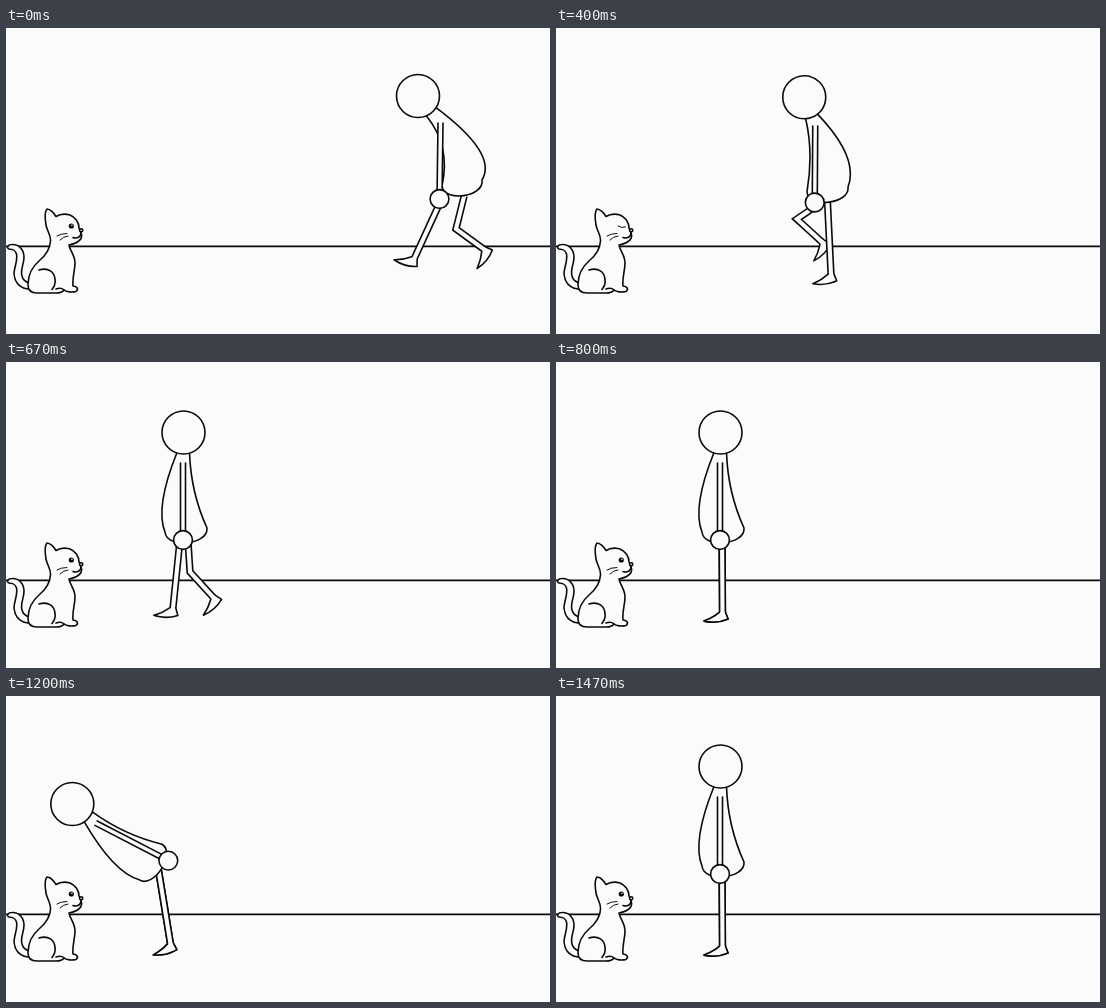
Recreate the animation shown at these times as an HTML page. Size 544 by 306 pixels, loop 2.54 s.

```html
<!DOCTYPE html>
<html lang="en">
<head>
<meta charset="utf-8">
<title>Walking up to the cat</title>
<style>
  html, body { margin: 0; width: 100%; height: 100%; overflow: hidden; background: #fbfbfb; }
  svg { display: block; width: 100vw; height: 100vh; }
  .ink { fill: #fbfbfb; stroke: #0a0a0a; stroke-width: 1.6; stroke-linecap: round; stroke-linejoin: round; }
  .line { fill: none; }
  .thin { fill: none; stroke-width: 1; }
  .tube { fill: none; stroke: #0a0a0a; stroke-width: 7.3; }
  .core { fill: none; stroke: #fbfbfb; stroke-width: 4.1; stroke-linecap: square; }
</style>
</head>
<body>
<svg viewBox="0 0 544 306">
  <path class="ink line" d="M0 218.4H544"/>

  <g class="ink">
    <path d="M22 261C14 260 9 255 8 246C8 239 12 233 10.500 226C9 221 6 221.500 3 221C0 219.500 2 216.500 6 216.500C13 216 18 222 18 229C18 237 14 241 16 248C17 252 20 254 23 255"/>
    <path d="M41 181C38.500 184 39 191 40 197C41 203 45 207 44.500 213C44 222 39 228 33 233C26 239 22 248 22 257C22 263 25 265 31 265L50 265C55 265 57 263.500 58 262C60 264 66 264.500 70 263.500C73 261 71 258.500 67 258C66 250 69 243 69 235C69 227 64 223 63 217C68 216 73 214 75 210.500C76 208 75.500 206 75 205L73 200C73 194 69 189 64 187C59 185.500 54 186 50 188.500C48 185 44 181 41 181Z"/>
    <path class="line" d="M33 242C42 239 49 244 49 252C50 257 47 260 46 261.500M58 262C56 260 53 260 50 261M75 205C75 209 71 211 67 209.500"/>
    <path class="thin" d="M51 208Q55 205.500 61 205.500M54 212Q57 208.500 62 208"/>
    <circle cx="75.200" cy="202.300" r="1.600"/>
  </g>
  <g id="open">
    <circle cx="65.300" cy="198" r="2.600" fill="#0a0a0a"/>
    <circle cx="65.900" cy="197.200" r="0.800" fill="#fbfbfb"/>
  </g>
  <path id="shut" class="ink thin" d="M62 198Q65 200.500 69.500 199"/>

  <g id="legs"></g>
  <path id="torso" class="ink"/>
  <path id="sleeve" fill="#fbfbfb"/>
  <path id="arm" class="ink line"/>
  <circle id="hand" class="ink" r="9.400"/>
  <circle id="head" class="ink" r="21.500"/>
</svg>
<script>
const $ = id => document.getElementById(id);
const LOOP = 2540, STEP = 200 / 3, LAST = 22, STOPPED = 13, LOWEST = 18;
const BONE = 34, HEAD = 21.5, SAG = 17;

// Upper body around the hip, standing tall and hunched over
const tall = { head: [-1.5, -107.5], shoulder: [-2, -77], hand: [-2, 0],
  front: [-20, -8], belly: [-30, -33], rear: [22, -12], back: [6, -47] };
const hunched = { head: [-44, -102], shoulder: [-21.5, -75], hand: [-22.5, 1],
  front: [-20, -12], belly: [-11, -52], rear: [20, -18], back: [36, -44] };

// Step, hip x, hunch, then each ankle around the hip
const walk = [
  [0, 456, 1, -47.5, 60, 21.5, 51],
  [3, 409, 1, 13.5, 64, -14, 40],
  [4.5, 340, 0.8, 21.5, 54, -47, 62],
  [6, 271, 0.5, -5, 40, 4, 72],
  [10, 179, 0, -12, 68, 28, 57],
  [12, 166, 0, 0.5, 72, 0.5, 72]
];

// Monotone cubic through the rows, one column at a time
function sample(rows, n) {
  const last = rows.length - 1;
  if (n >= rows[last][0]) return rows[last];
  const k = rows.findIndex(r => r[0] > n) - 1;
  const span = rows[k + 1][0] - rows[k][0], u = (n - rows[k][0]) / span;
  return rows[k].map((a, i) => {
    const slope = j => (rows[j + 1][i] - rows[j][i]) / (rows[j + 1][0] - rows[j][0]);
    const tangent = j => {
      if (j === 0) return slope(0);
      if (j === last) return 0;
      const l = slope(j - 1), r = slope(j);
      return l * r <= 0 ? 0 : 2 * l * r / (l + r);
    };
    const b = rows[k + 1][i], v = 1 - u;
    return a + (b - a) * u * u * (3 - 2 * u)
      + span * u * v * (tangent(k) * v - tangent(k + 1) * u);
  });
}

// Bow in degrees: quick down, smooth back up
function bowAt(n) {
  if (n < STOPPED) return 0;
  if (n < LOWEST) return 52 * Math.sin(Math.PI / 2 * (n - STOPPED) / (LOWEST - STOPPED));
  return 26 * (1 + Math.cos(Math.PI * (n - LOWEST) / (LAST - LOWEST)));
}

const add = (p, q, k = 1) => [p[0] + q[0] * k, p[1] + q[1] * k];
const mix = (p, q, k) => [p[0] + (q[0] - p[0]) * k, p[1] + (q[1] - p[1]) * k];
const turn = ([x, y], a) => [x * Math.cos(a) + y * Math.sin(a), y * Math.cos(a) - x * Math.sin(a)];
const polar = (r, a) => [r * Math.cos(a), r * Math.sin(a)];
const at = (...pts) => pts.map(p => p.map(v => v.toFixed(2)).join(' ')).join(' ');
const path = (el, d) => el.setAttribute('d', d);
function normal(a, b) {
  const dx = b[0] - a[0], dy = b[1] - a[1], len = Math.hypot(dx, dy);
  return [-dy / len, dx / len];
}
function place(el, p) {
  el.setAttribute('cx', p[0]);
  el.setAttribute('cy', p[1]);
}

function makeLeg() {
  const [tube, foot, core] = ['tube', 'ink', 'core'].map(name => {
    const p = document.createElementNS('http://www.w3.org/2000/svg', 'path');
    p.setAttribute('class', name);
    return $('legs').appendChild(p);
  });
  return (hip, ankle) => {
    const half = Math.hypot(ankle[0] - hip[0], ankle[1] - hip[1]) / 2;
    const bend = Math.sqrt(Math.max(0, BONE * BONE - half * half));
    const knee = add(mix(hip, ankle, 0.5), normal(hip, ankle), bend);
    const swing = Math.atan2(ankle[0] - knee[0], ankle[1] - knee[1]);
    const sole = (x, y) => add(ankle, turn([x, y], swing * 0.85));
    const side = normal(knee, ankle);
    const bone = 'M' + at(hip) + 'L' + at(knee) + 'L' + at(ankle);
    path(tube, bone);
    path(core, bone);
    path(foot, 'M' + at(add(ankle, side, 2.85)) + 'Q' + at(sole(-10, 6), sole(-18.5, 9))
      + 'Q' + at(sole(-6, 12), sole(5.5, 7)) + 'L' + at(add(ankle, side, -2.85)));
  };
}
const legA = makeLeg(), legB = makeLeg();

function draw(n) {
  const [, x, hunch, ax, ay, bx, by] = sample(walk, n);
  const bow = bowAt(n), tilt = bow * Math.PI / 180, reach = Math.min(1, bow / 33);
  const root = [x, 178 - 8 * hunch];
  const hip = add(root, [-0.27 * bow, -5 * reach]);
  const curl = 1 - (1 - hunch) ** 3;

  const part = (name, k = hunch, shift = [0, 0]) =>
    add(hip, turn(add(mix(tall[name], hunched[name], k), shift), tilt));
  const head = part('head'), shoulder = part('shoulder');
  const hand = part('hand', hunch, [15 * reach, 3 * reach]);
  const front = part('front'), rear = part('rear');

  for (const [leg, dx, dy] of [[legA, ax, ay], [legB, bx, by]]) {
    const socket = add(hip, [dx * (dx < 0 ? 0.4 : 0.1), -2]);
    leg(socket, add(root, [dx - 0.04 * bow, dy - 0.05 * bow]));
  }

  const neck = Math.atan2(shoulder[1] - head[1], shoulder[0] - head[0]);
  const collar = a => add(head, polar(HEAD, neck + a));
  const down = normal(front, rear);
  path($('torso'), 'M' + at(collar(0.3)) + 'Q' + at(part('belly', curl), front)
    + 'C' + at(add(front, down, SAG), add(rear, down, SAG), rear)
    + 'Q' + at(part('back', curl), collar(-0.3)));

  const side = normal(shoulder, hand);
  const edge = k => [at(add(shoulder, side, k)), at(add(hand, side, k))];
  const [a, b] = edge(2.5), [d, c] = edge(-2.5);
  path($('sleeve'), `M${a}L${b}L${c}L${d}Z`);
  path($('arm'), `M${a}L${b}M${d}L${c}`);
  place($('hand'), hand);
  place($('head'), head);

  const blink = n >= 5 && n <= 8;
  $('open').style.display = blink ? 'none' : '';
  $('shut').style.display = blink ? '' : 'none';
}

// The drawing advances fifteen times a second, then rests
let shown = -1;
function tick() {
  const t = Math.floor((performance.now() % LOOP) / 10) * 10;
  const n = Math.min(LAST, Math.floor((t + 4) / STEP));
  if (n !== shown) draw(shown = n);
  requestAnimationFrame(tick);
}
tick();
</script>
</body>
</html>
```
